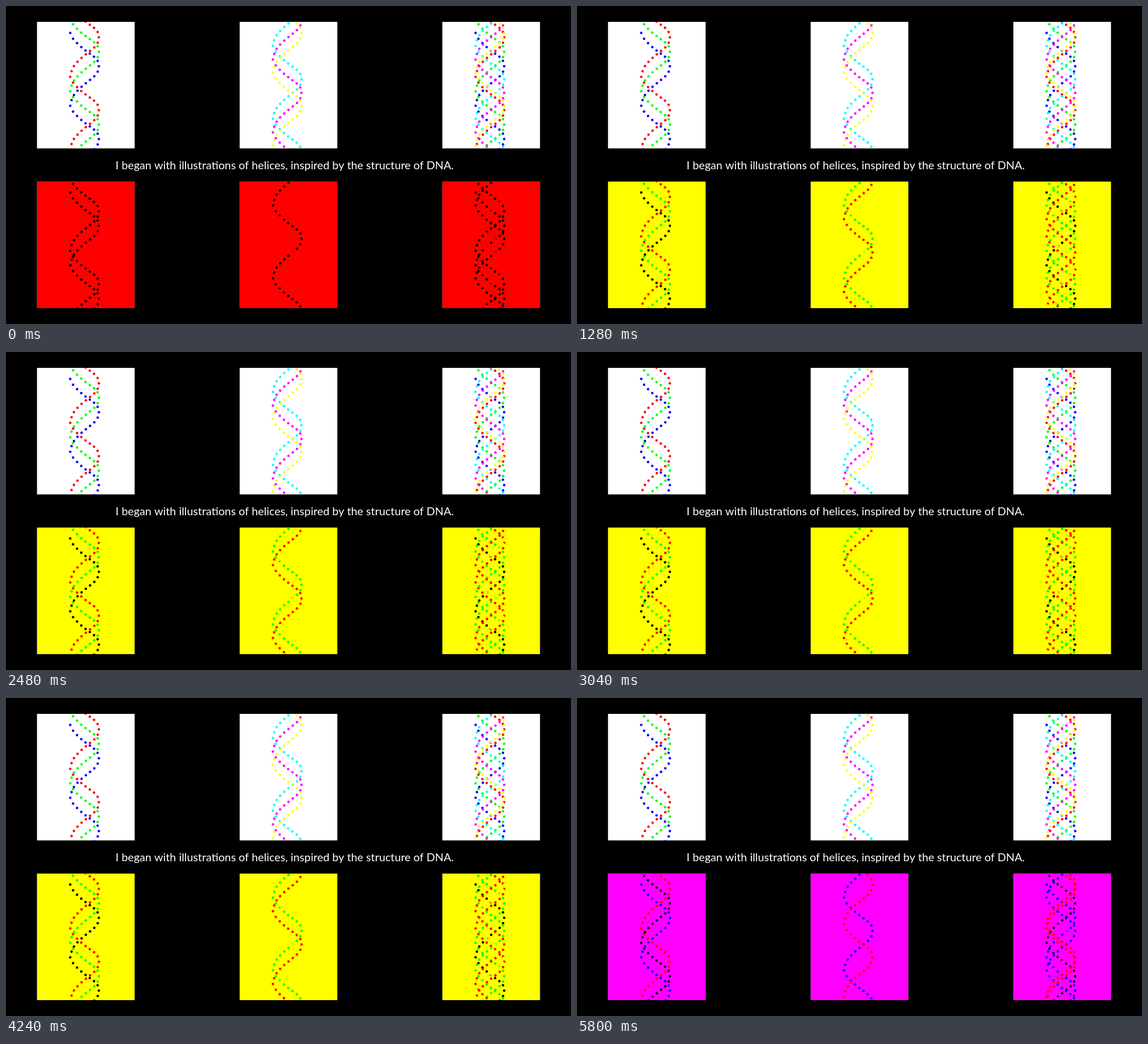
Animation, 998 px wide and 561 px high, one loop 5.88 s. Source, as an HTML page with a canvas:

```html
<!DOCTYPE html>
<html lang="en">
<head>
<meta charset="utf-8">
<title>Helices under coloured light</title>
<style>
html, body { margin: 0; width: 100%; height: 100%; overflow: hidden; background: #000; }
canvas { display: block; }
</style>
</head>
<body>
<canvas id="stage" width="998" height="561"></canvas>
<script>
const ctx = document.getElementById('stage').getContext('2d');
const LOOP = 5880, TICK = 40, TICKS_PER_LIGHT = 22 / 9;
const PANEL = { w: 173, h: 223.5 };
const COLUMNS = [54.5, 412.5, 770.5];
const TOP = 28, BOTTOM = 309.5;
const LIGHTS = ['#f00', '#ff0', '#0f0', '#0ff', '#00f', '#f0f'];

// One turn of a strand: beads evenly spaced along the curve
const TURN = [
  [59, 0], [64, 10.3], [71, 18], [78.5, 25], [86, 31], [93.5, 36.5],
  [101, 42], [107.3, 49.3], [109.5, 58.7], [107.5, 68.3], [101.5, 76.5],
  [94, 82.7], [86.5, 88.7], [79, 95], [71.8, 102], [65.5, 109.5], [61.3, 118.5]
];
const PITCH = 128.5, RADIUS = 2.2;

const RGB = [['#f00', -31.5], ['#0f0', -6], ['#00f', 19.5]];
const CMY = [['#0ff', -86], ['#f0f', -62], ['#ff0', -39]];
const GROUPS = [RGB, CMY, [...RGB, ...CMY]];

function drawStrand([color, start]) {
  ctx.fillStyle = color;
  for (let top = start; top < PANEL.h + RADIUS; top += PITCH) {
    for (const [x, y] of TURN) {
      ctx.beginPath();
      ctx.arc(x, top + y, RADIUS, 0, Math.PI * 2);
      ctx.fill();
    }
  }
}

function drawPanel(x, y, strands, light) {
  ctx.save();
  ctx.translate(x, y);
  ctx.beginPath();
  ctx.rect(0, 0, PANEL.w, PANEL.h);
  ctx.clip();
  ctx.fillStyle = '#fff';
  ctx.fillRect(0, 0, PANEL.w, PANEL.h);
  strands.forEach(drawStrand);
  ctx.globalCompositeOperation = 'multiply';
  ctx.fillStyle = light;
  ctx.fillRect(0, 0, PANEL.w, PANEL.h);
  ctx.restore();
}

function drawCaption() {
  ctx.fillStyle = '#fff';
  ctx.font = '19.8px Lato, Carlito, sans-serif';
  ctx.textAlign = 'center';
  ctx.fillText('I began with illustrations of helices, inspired by the structure of DNA.', 492.3, 288);
}

function lightAt(time) {
  const tick = Math.floor((time % LOOP) / TICK);
  const step = Math.floor(tick / TICKS_PER_LIGHT + 1e-6);
  return LIGHTS[step % LIGHTS.length];
}

function draw(time) {
  ctx.fillStyle = '#000';
  ctx.fillRect(0, 0, 998, 561);
  const light = lightAt(time);
  GROUPS.forEach((strands, i) => {
    drawPanel(COLUMNS[i], TOP, strands, '#fff');
    drawPanel(COLUMNS[i], BOTTOM, strands, light);
  });
  drawCaption();
}

const began = performance.now();
function loop() {
  draw(performance.now() - began);
  requestAnimationFrame(loop);
}
loop();
</script>
</body>
</html>
```
